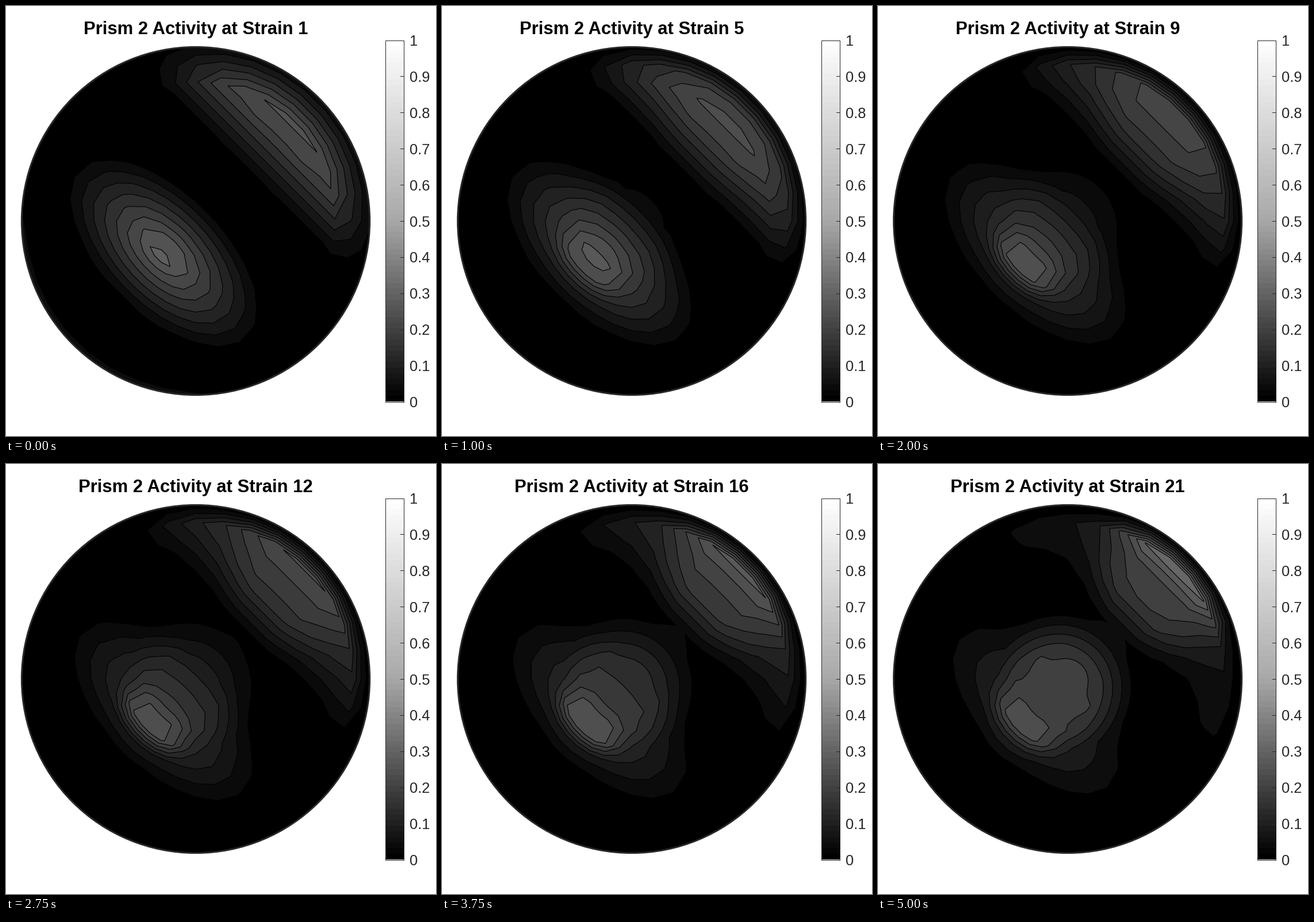
A matplotlib script for the animation above (5250 ms loop, 748 by 748 pixels).

```python
import numpy as np
import matplotlib.pyplot as plt
from matplotlib.animation import FuncAnimation
from matplotlib.colors import LinearSegmentedColormap
from matplotlib.patches import Circle, Rectangle

SIZE, FRAMES = 748, 21
CX, CY, RADIUS = 330, 374, 303
DARK = "#262626"
LEVELS = range(1, 9)

# Polar mesh: 10 degree rays, 10 rings
rays = np.arange(0, 361, 10)
phi, rho = np.meshgrid(np.radians(rays), np.linspace(0, 1, 11))
X = CX + RADIUS * rho * np.cos(phi)
Y = CY - RADIUS * rho * np.sin(phi)

# Both poles are symmetric about the 45 degree diagonal.
angle = np.abs((rays - 45 + 180) % 360 - 180) * np.ones_like(rho)
u = rho * np.cos(phi - np.pi / 4)
w = rho * np.sin(phi - np.pi / 4)


def smooth(lo, hi, x):
    s = np.clip((x - lo) / (hi - lo), 0, 1)
    return s * s * (3 - 2 * s)


def mix(a, b, t):
    return a + (b - a) * t


def upper_pole(t):
    """A slope towards the rim that turns into a shelf with a sharp ridge."""
    slope = np.interp(u, [.38, .68, .85], [0, 6.2, 7.7])
    shelf = np.interp(u, [.34, .6, .8], [0, 5, 5.4])
    shelf *= (.36 + .64 * smooth(42, 14, angle)) * smooth(80, 60, angle)
    wing = 1.6 * smooth(78, 58, angle) * smooth(.55, .9, rho)
    edge = mix(.55, 1, min(1, 2 * t))
    rim = mix(.18, .06, min(1, 3 * t))
    falloff = np.interp(rho, [.8, .9, 1], [1, edge, rim])
    ridge = np.interp(rho, [.77, .9, 1], [0, 1, 0]) * smooth(36, 5, angle)
    body = mix(slope, np.maximum(shelf, wing), t) * falloff
    return body * (1 + .4 * t * (1 - t)) + 3.6 * t * t * ridge


def lower_pole(t):
    """An elliptic cone that flattens while a ridge grows at its outer side."""
    cone = 9.2 - 8.2 * np.hypot((u + .26) / .34, w / .68)
    cone = np.maximum(cone, 0)
    q = np.hypot((u + .12) / .46, w / .42)
    plateau = np.interp(q, [.5, .66, 1.02, 1.14], [5.2, 4, 1, 0])
    ridge = np.interp(rho, [.2, .4, .5], [0, 1, 0]) * smooth(135, 165, angle)
    height = 2.1 * t + 2.2 * np.sin(np.pi * t)
    return mix(cone, np.maximum(plateau, .52 * cone), t) + height * ridge


def density(t):
    z = np.maximum(upper_pole(t), lower_pole(t))
    # The rim repeats on the opposite side.
    opposite = (np.arange(rays.size) + 18) % 36
    z[-1] = np.maximum(z[-1], z[-1][opposite])
    return z


def grays(t):
    step = .046 + .004 * t - .01 * np.sin(np.pi * t) ** 2
    return [str(k * step) for k in LEVELS]


plt.rcParams["font.family"] = "Liberation Sans"
fig = plt.figure(figsize=(SIZE / 100, SIZE / 100), dpi=100, facecolor="white")
ax = fig.add_axes([0, 0, 1, 1])
ax.axis("off")

ax.add_patch(Circle((CX, CY), RADIUS, fc="black", ec="none", zorder=1))
ax.add_patch(Circle((CX, CY), RADIUS - .3, fc="none", ec="#282828",
                    lw=2.1, zorder=5))
title = ax.text(CX, 49, "", size=22.3, weight="bold", ha="center",
                va="baseline")

# Colour bar
LEFT, RIGHT, TOP, BOTTOM = 660.5, 692.5, 59.5, 688.5
ramp = LinearSegmentedColormap.from_list("ramp", ["black", "0.66", "white"],
                                         N=64)
ax.imshow(np.linspace(1, 0, 64)[:, None], cmap=ramp, vmin=0, vmax=1,
          extent=(LEFT, RIGHT, BOTTOM, TOP), aspect="auto",
          interpolation="nearest")
ax.add_patch(Rectangle((LEFT, TOP), RIGHT - LEFT, BOTTOM - TOP,
                       fc="none", ec=DARK, lw=.72, zorder=3))
for i in range(11):
    y = mix(BOTTOM, TOP, i / 10)
    ax.plot([RIGHT - 6, RIGHT], [y, y], color=DARK, lw=.72, zorder=3)
    ax.text(702, y + 9.5, f"{i / 10:g}", size=18.4, color=DARK, va="baseline")

drawn = []


def update(i):
    while drawn:
        drawn.pop().remove()
    t = i / (FRAMES - 1)
    z = density(t)
    drawn.append(ax.contourf(X, Y, z, levels=LEVELS, colors=grays(t),
                             extend="max", antialiased=True, zorder=2))
    drawn.append(ax.contour(X, Y, z, levels=LEVELS, colors="black",
                            linewidths=.8, zorder=3))
    ax.set_xlim(0, SIZE)
    ax.set_ylim(SIZE, 0)
    title.set_text(f"Prism 2 Activity at Strain {i + 1}")
    return [title]


anim = FuncAnimation(fig, update, frames=FRAMES, interval=250,
                     init_func=lambda: update(0), repeat=True,
                     repeat_delay=0, blit=False)
plt.show()
```
